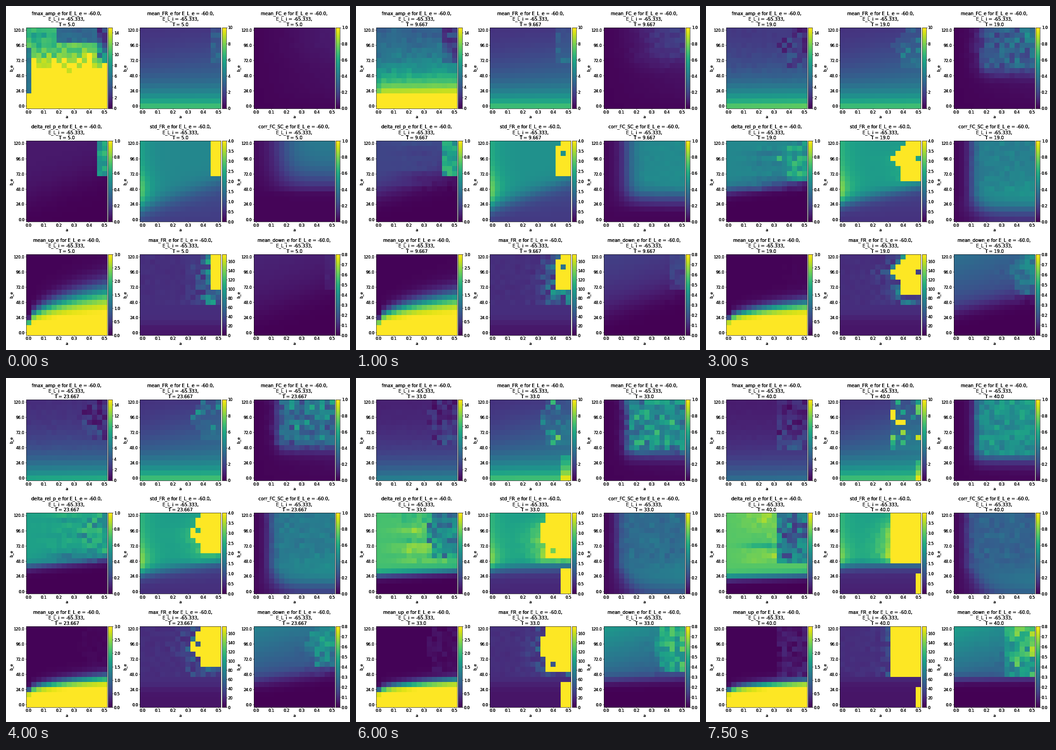
Animation of 748 by 748 pixels, one loop 8000 ms. Source, as a matplotlib script:

```python
import numpy as np
import matplotlib.pyplot as plt
from matplotlib.animation import FuncAnimation

SIZE, DPI = 748, 72
N, STEPS = 16, 16
SIDE = 176
LEFT, TOP, PITCH_X, PITCH_Y = 43.8, 46.6, 247.4, 246.5

# name, colour limit, colour bar step
PANELS = [
    ("fmax_amp_e", 15, 2), ("mean_FR_e", 10, 2), ("mean_FC_e", 1, 0.2),
    ("delta_rel_p_e", 1, 0.2), ("std_FR_e", 4, 0.5), ("corr_FC_SC_e", 1, 0.2),
    ("mean_up_e", 3, 0.5), ("max_FR_e", 175, 20), ("mean_down_e", 0.8, 0.1),
]

a = np.linspace(0, 1, N)[None, :]
b = np.linspace(0, 120, N)[:, None]
col = np.arange(N)[None, :]


def sig(x):
    return 1 / (1 + np.exp(-x))


def bump(x):
    return np.exp(-x * x)


class State:
    """Quantities the nine fields share at one step of T."""

    def __init__(self, k):
        self.p = k / (STEPS - 1)
        self.T = 5 + 35 * self.p
        self.fade = np.exp(-2.5 * self.p)
        self.rise = np.sin(np.pi / 2 * self.p)
        self.slope = 4 + 44 * sig((0.45 - self.p) / 0.13) * a
        self.rng = np.random.default_rng(40 + k)
        self.find_bursts()

    def find_bursts(self):
        p = self.p
        # The front moves left with T, its tip near b = 92 leading
        edge = 14 - 3.9 * p - 2 * np.sin(np.pi * p) * bump((b - 92) / 14)
        edge = np.round(edge + 0.3 * np.sin(np.pi * p) * self.noise(N, 1))
        upper = b > 68 - 22 * p
        self.burst = (col >= edge) & upper
        self.lower = (col >= 10 + 5 * p) & (b < 70 - 44 * p) & (p > 0.7)
        holes = self.rand() < 0.025
        self.mask = (self.burst & ~holes) | self.lower
        self.near = np.exp(np.minimum(col - edge + 1, 0) / 2.5) * (b > 45)

    def noise(self, *shape):
        return np.clip(self.rng.normal(size=shape or (N, N)), -2, 2)

    def rand(self):
        return self.rng.random((N, N))


def fmax_amp(s):
    f = 208 / s.T * (0.19 + 0.8 * np.exp(-b / 37.5)) * (1 + 0.04 * a)
    f = f * (1 + (0.015 + 0.06 * s.fade) * s.noise() * sig((b - 45) / 6))
    f = np.where(s.burst, f * (0.3 + s.rand() * (0.35 + s.T / 28)), f)
    early = s.fade ** 6
    f = f * (1 - 0.48 * early * (b > 100) * (a > 0.38))
    f = f * (1 - early * (0.9 - b / 200) * (col == 0) * (b > 20) * (b < 92))
    return np.where(f > 13.7, 15, f)


def mean_fr(s):
    f = 1.2 + 5.6 * np.exp(-b / 40) + (0.3 + s.T / 60) * a * bump((b - 70) / 50)
    f = f + s.burst * (0.6 + (1 + 8 * s.p ** 2) * s.rand() ** 5)
    return np.where(s.lower, f * 1.38, f)


def mean_fc(s):
    mid = 76 - 43 * s.p
    level = sig((b - mid) / (2 + 8 * s.fade))
    side = sig((col - 3.6 - 5.5 * s.fade ** 1.5) / (0.5 + 2.5 * s.fade ** 2))
    tail = 0.13 * sig((s.p - 0.33) / 0.08) * sig((b - mid + 14) / 4)
    grain = 1 + (0.1 + 0.2 * np.sin(np.pi * s.p)) * s.noise()
    main = (0.04 + 0.44 * s.rise) * level * grain
    return 0.01 + side * (main + tail * (1 - level)) + 0.03 * a * sig((b - 10) / 10)


def delta_rel(s):
    mid = 20 + 27 * bump((s.p - 0.3) / 0.4) + 45 * s.fade * a
    f = (0.07 + 0.67 * s.rise) * sig((b - mid) / (3 + 14 * s.fade ** 2))
    streak = 0.07 * s.noise(N, 1) * bump((a - 0.5) / 0.28)
    grain = 0.03 * s.noise() * sig((a - 0.3) * 12)
    f = f + (b > 40) * s.rise * (streak + grain)
    inside = 0.58 - 0.22 * s.p ** 3 + (0.2 + 0.2 * s.p) * (s.rand() - 0.5)
    return np.where(s.burst, inside, f)


def std_fr(s):
    level = sig((b - 12 - 24 * s.p - s.slope) / (4 + 5 * s.fade))
    high = 2.2 - 0.35 * s.fade ** 2
    high = high + 1.1 * np.exp(-a / 0.13) * (0.35 + 0.65 * bump((b - 42) / 32))
    late = 1.2 * sig((s.p - 0.55) / 0.1)
    high = high + late * s.near * (1 + 0.12 * s.noise()) * bump((b - 66) / 45)
    low = 0.72 - 0.35 * s.p + 0.003 * b
    return np.where(s.mask, 4, low + (high - low) * level)


def corr(s):
    base = np.clip(1 - b / 40, 0, 1)
    start = 1.9 + 3.1 * s.fade + 3 * s.p * base
    side = sig((col - start) / (0.65 + 1.05 * s.fade ** 3 + 0.9 * base))
    floor = 0.9 * s.p
    step = sig((b - 5 - 57 * s.fade ** 1.7) / (5 + 10 * s.fade ** 4))
    level = (floor + (1 - floor) * step) * sig((b + 12 - 56 * s.fade ** 2) / 3)
    top = 0.5 - 0.2 * s.p - 0.1 * s.fade ** 6
    band = 0.08 * min(1, 3 * s.p) * bump((b - 58 + 40 * s.p) / 22) * a
    grain = 0.028 * (1 - s.fade) * s.noise() * sig((b - 40) / 6)
    return 0.015 + side * (top * level + band + grain)


def mean_up(s):
    mid = 22.5 - 5 * s.fade + (12 + 35 * s.fade) * a ** 0.5
    width = 2.7 + 9 * s.fade * a ** 0.5
    return 0.03 + 3.15 * sig((mid - b) / width) + s.burst * 0.3 * s.p ** 3 * s.rand()


def max_fr(s):
    f = 10 + 13 * sig((b - 14 - 24 * s.p) / 4)
    spill = 95 * (1 - 0.7 * s.p) * s.near ** 1.5 * s.rand() ** 1.6
    return np.where(s.mask, 175, f + (b > 40) * (s.noise() + spill))


def mean_down(s):
    mid = 22 + 14 * s.p ** 0.5 + s.slope
    f = (0.08 + 0.36 * s.rise) * sig((b - mid) / (3 + 12 * s.fade))
    f = f * (0.4 + 0.6 * b / 120) * (1 - 0.2 * a)
    extra = (0.03 + 0.28 * s.p) * (0.3 + 1.1 * s.rand()) * sig((a - 0.72) * 14)
    return f + s.burst * extra + s.near * 0.015 * s.rise * s.noise()


FIELDS = (fmax_amp, mean_fr, mean_fc, delta_rel, std_fr, corr, mean_up, max_fr, mean_down)

plt.rcParams.update({"font.family": "DejaVu Sans", "axes.linewidth": 0.7})
fig = plt.figure(figsize=(SIZE / DPI, SIZE / DPI), dpi=DPI, facecolor="white")


def write(x, y, text, size=8.4, **style):
    """Place text at stage pixels, laid down repeatedly for a heavier weight."""
    return [fig.text(x / SIZE, 1 - y / SIZE, text, fontsize=size, **style) for _ in range(3)]


def add_axes(x, y, w, h):
    ax = fig.add_axes([x / SIZE, 1 - (y + h) / SIZE, w / SIZE, h / SIZE])
    ax.tick_params(length=1.75, width=0.7)
    return ax


def add_panel(index):
    name, limit, step = PANELS[index]
    x, y = LEFT + index % 3 * PITCH_X, TOP + index // 3 * PITCH_Y
    bottom, cell = y + SIDE, SIDE / N

    ax = add_axes(x, y, SIDE, SIDE)
    image = ax.imshow(np.zeros((N, N)), origin="lower", aspect="auto", cmap="viridis",
                      vmin=0, vmax=limit, interpolation="nearest")
    ticks = range(0, N, 3)
    ax.set_xticks(ticks, [])
    ax.set_yticks(ticks, [])
    for t in ticks:
        offset = (t + 0.5) * cell
        write(x + offset, bottom + 3.9, f"{t / 30:.1f}", ha="center", va="top")
        write(x - 3.6, bottom - offset + 0.4, f"{t * 8:.1f}", ha="right", va="center_baseline")
    write(x + SIDE / 2, bottom + 18.5, "a", ha="center", va="center")
    write(x - 32.3, y + SIDE / 2, "b_e", ha="center", va="center", rotation=90)

    bar = add_axes(x + SIDE + 2.6, y, 9, SIDE)
    bar.imshow(np.linspace(0, 1, 256)[:, None], origin="lower", aspect="auto",
               cmap="viridis", extent=(0, 1, 0, limit))
    bar.yaxis.tick_right()
    values = np.arange(0, limit + step * 0.01, step)
    bar.set_xticks([])
    bar.set_yticks(values, [])
    for v in values:
        label = f"{v:.1f}" if step < 1 else f"{v:.0f}"
        write(x + SIDE + 15.2, bottom - v / limit * SIDE + 0.4, label,
              ha="left", va="center_baseline")

    title = write(x + SIDE / 2, y - 2.7, "", 9.8, ha="center", va="baseline")
    return name, image, title


panels = [add_panel(i) for i in range(len(PANELS))]


def update(k):
    state = State(k)
    artists = []
    for (name, image, title), field in zip(panels, FIELDS):
        image.set_data(field(state))
        for text in title:
            text.set_text(f"{name} for E_L_e = -60.0,\nE_L_i = -65.333,\nT = {round(state.T, 3)}")
        artists += [image, *title]
    return artists


update(0)
animation = FuncAnimation(fig, update, frames=STEPS, interval=500, repeat=True,
                          repeat_delay=0, blit=False)
plt.show()
```
